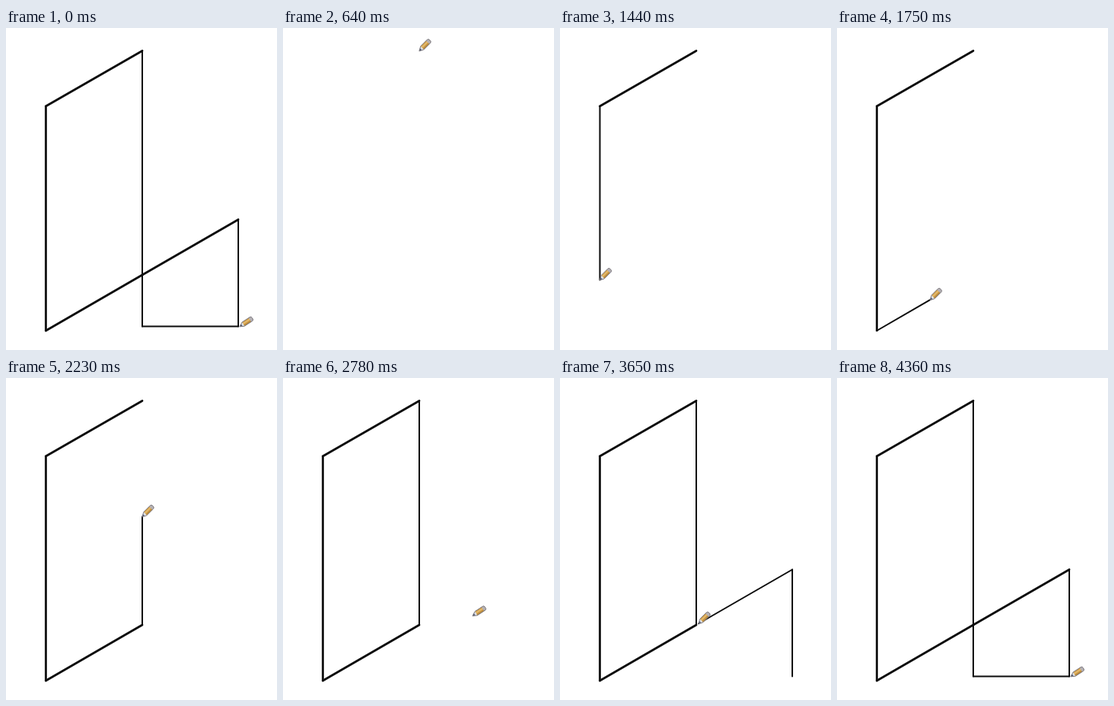
Recreate the animation shown at these times as an HTML page with a canvas. Size 350 by 416 pixels, loop 5.6 s.

```html
<!DOCTYPE html>
<html lang="en">
<head>
<meta charset="utf-8">
<title>Pencil drawing</title>
<style>
  html, body { margin: 0; width: 100%; height: 100%; overflow: hidden; background: #fff; }
  canvas { display: block; }
</style>
</head>
<body>
<canvas id="stage" width="350" height="416"></canvas>
<script>
const ctx = document.getElementById('stage').getContext('2d');
const LOOP = 5600, START = 240, SETTLE = 4360, STEP = 79.18, LAST = 49;
const LEFT = 51.5, MIDDLE = 176, RIGHT = 300, BASE = 385.5, CROSSING = 319;
const BOLD = 2.7, THIN = 2, LIFTED = 0;

// Each move ends at x, y on the given step; a lifted pencil leaves no line and lies flatter
const move = (step, x, y, width) => ({ step, x, y, width, tilt: width ? -45 : -33 });

const path = [
  move(5, MIDDLE, 29.5, BOLD),
  move(8.5, LEFT, 101, BOLD),
  move(16.9, LEFT, 391, BOLD),
  move(20.7, MIDDLE, CROSSING, BOLD),
  move(29.6, MIDDLE, 29.5, THIN),
  move(32, 245, 307, LIFTED),
  move(35, RIGHT, BASE, LIFTED),
  move(39, RIGHT, 247.5, THIN),
  move(43.1, MIDDLE, CROSSING, BOLD),
  move(45, MIDDLE, BASE, THIN),
  move(49, RIGHT, BASE, THIN),
  move(50, RIGHT + 2, BASE, LIFTED)
];

const mix = (a, b, part) => a + (b - a) * part;

function blend(from, to, part) {
  const pose = {};
  for (const key of ['x', 'y', 'tilt']) pose[key] = mix(from[key], to[key], part);
  return pose;
}

function box(color, x, y, width, height) {
  ctx.fillStyle = color;
  ctx.fillRect(x, y, width, height);
}

// The tip lies at the origin, the body along the x axis
function pencil({ x, y, tilt }) {
  ctx.save();
  ctx.translate(x, y);
  ctx.rotate(tilt * Math.PI / 180);
  ctx.beginPath();
  ctx.moveTo(0, 0);
  ctx.lineTo(5.5, -3);
  ctx.lineTo(17.5, -3);
  ctx.quadraticCurveTo(19.5, -3, 19.5, 0);
  ctx.quadraticCurveTo(19.5, 3, 17.5, 3);
  ctx.lineTo(5.5, 3);
  ctx.closePath();
  ctx.save();
  ctx.clip();
  box('#dde0e6', 0, -3, 6, 6);
  box('#45506e', 0, -3, 3, 6);
  box('#d3a04a', 5.5, -3, 10.5, 6);
  box('#e6c077', 5.5, -1.3, 10.5, 1.3);
  box('#b98a3e', 5.5, 1.2, 10.5, 1.8);
  box('#b5b1b4', 15.5, -3, 4, 6);
  ctx.restore();
  ctx.strokeStyle = '#77747a';
  ctx.lineWidth = 0.9;
  ctx.stroke();
  ctx.restore();
}

// The picture moves in steps that fall on whole hundredths of a second
function stepAt(time) {
  if (time < START || time >= SETTLE) return LAST + 1;
  return Math.min(LAST, Math.floor(Math.floor((time - START) / 10) * 10 / STEP));
}

function draw(time) {
  const step = stepAt(time);
  let pose = path[0];
  box('#fff', 0, 0, 350, 416);
  ctx.lineCap = 'round';
  for (let i = 1; i < path.length && path[i - 1].step < step; i++) {
    const from = path[i - 1], to = path[i];
    const part = Math.min(1, (step - from.step) / (to.step - from.step));
    pose = blend(from, to, part);
    if (to.width === LIFTED) continue;
    ctx.strokeStyle = '#0c0c0c';
    ctx.lineWidth = part < 1 ? THIN : to.width;
    ctx.beginPath();
    ctx.moveTo(from.x, from.y);
    ctx.lineTo(pose.x, pose.y);
    ctx.stroke();
  }
  pencil(pose);
}

const begin = performance.now();
function tick() {
  draw((performance.now() - begin) % LOOP);
  requestAnimationFrame(tick);
}
tick();
</script>
</body>
</html>
```
